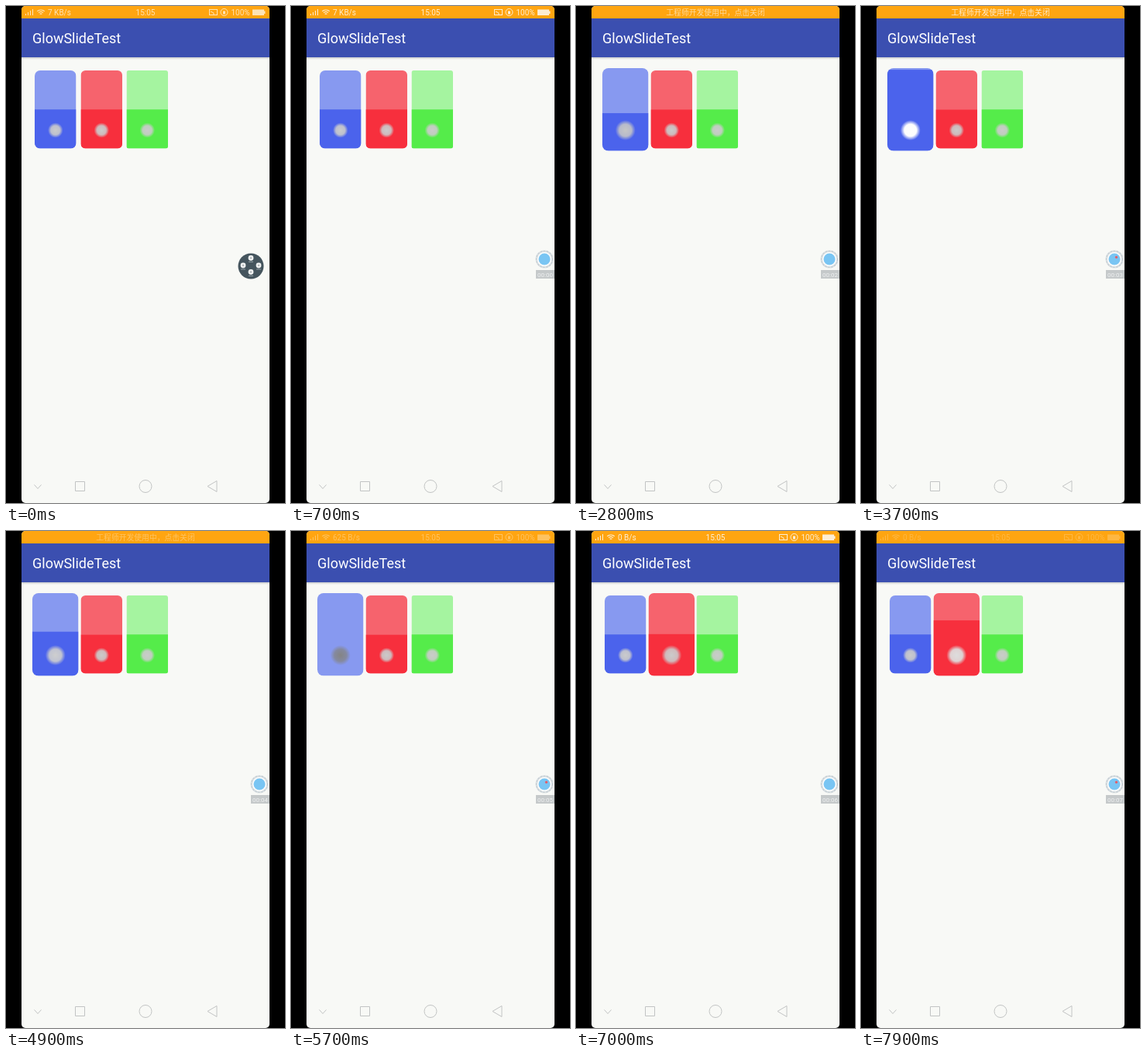
An HTML page with a canvas for the animation above (8 s loop, 360 px wide and 640 px high).

```html
<!DOCTYPE html>
<html lang="en">
<head>
<meta charset="utf-8">
<style>
html, body { margin: 0; width: 100%; height: 100%; overflow: hidden; background: #000; }
canvas { display: block; }
</style>
</head>
<body>
<canvas id="stage" width="360" height="640"></canvas>
<script>
const LOOP = 8000;
const ctx = document.getElementById('stage').getContext('2d');
const PAPER = '#f8f9f6', PALE = '#fdf3df';

const clamp = v => Math.max(0, Math.min(1, v));
const ramp = (t, from, to) => clamp((t - from) / (to - from));
const mix = (a, b, k) => a + (b - a) * k;

// Piecewise linear value from [time, value] pairs
function track(points, t) {
  let value = points[0][1];
  for (let i = 1; i < points.length; i++) {
    const [t0, v0] = points[i - 1], [t1, v1] = points[i];
    if (t >= t0) value = mix(v0, v1, ramp(t, t0, t1));
  }
  return value;
}

function rect(x, y, w, h, color) {
  ctx.fillStyle = color;
  ctx.fillRect(x, y, w, h);
}

function disc(x, y, r, color) {
  ctx.fillStyle = color;
  ctx.beginPath();
  ctx.arc(x, y, r, 0, 7);
  ctx.fill();
}

function ring(x, y, r, color, width = 1) {
  ctx.strokeStyle = color;
  ctx.lineWidth = width;
  ctx.beginPath();
  ctx.arc(x, y, r, 0, 7);
  ctx.stroke();
}

function line(points, color, closed) {
  ctx.strokeStyle = color;
  ctx.lineWidth = 1;
  ctx.beginPath();
  points.forEach(([x, y]) => ctx.lineTo(x, y));
  if (closed) ctx.closePath();
  ctx.stroke();
}

function label(text, x, y, size, color, align = 'left') {
  ctx.font = `${size}px Roboto, "Noto Sans CJK SC", "Noto Sans CJK", sans-serif`;
  ctx.textAlign = align;
  ctx.fillStyle = color;
  ctx.fillText(text, x, y);
}

function clipRound(x, y, w, h, r) {
  ctx.beginPath();
  ctx.roundRect(x, y, w, h, r);
  ctx.clip();
}

function statusIcons(t) {
  for (let i = 0; i < 4; i++) rect(25 + i * 3, 10 - i * 2, 1, 2 + i * 2, PALE);
  for (const r of [2, 4.5, 7]) {
    ctx.strokeStyle = PALE;
    ctx.lineWidth = 1.2;
    ctx.beginPath();
    ctx.arc(45, 12, r, -2.3, -0.84);
    ctx.stroke();
  }
  const speed = t < 5000 ? '7 KB/s' : t < 6200 ? '625 B/s' : '0 B/s';
  label(speed, 54, 12, 10, PALE);
  label('15:05', 180, 12, 10, PALE, 'center');

  ctx.strokeStyle = PALE;
  ctx.lineWidth = 1;
  ctx.strokeRect(262.5, 4.5, 10, 7);
  line([[264, 7], [268, 9], [268, 11]], PALE);
  ring(281.5, 8, 4.5, PALE);
  rect(280, 6.5, 3, 4, PALE);
  label('100%', 290.5, 12, 10, PALE);
  rect(318, 4.5, 15, 7.5, PALE);
  rect(333, 6.5, 1.5, 3.5, PALE);
}

function statusBar(t) {
  rect(20, 0, 320, 16, '#ffa511');
  ctx.globalAlpha = track([[0, .8], [800, .95], [1300, .95], [2250, 0], [5300, 0], [6300, .95], [7000, .95], [8200, 0]], t);
  statusIcons(t);
  ctx.globalAlpha = track([[2200, 0], [3000, .9], [4400, .9], [5300, 0]], t);
  label('工程师开发使用中，点击关闭', 180, 12, 9.8, PALE, 'center');
  ctx.globalAlpha = 1;
}

function appBar() {
  const shadow = ctx.createLinearGradient(0, 66, 0, 69);
  shadow.addColorStop(0, 'rgba(60,65,80,.25)');
  shadow.addColorStop(1, 'rgba(60,65,80,0)');
  rect(20, 66, 320, 3, shadow);
  rect(20, 16, 320, 50, '#3b4fb0');
  label('GlowSlideTest', 34, 47.5, 18, '#fff');
}

function sun(x, y, r, level) {
  const k = Math.pow(level, .8);
  const rgb = [0, 1, 2].map(() => Math.round(mix(132, 255, k)));
  const glow = ctx.createRadialGradient(x, y, 0, x, y, r);
  glow.addColorStop(0, `rgb(${rgb})`);
  glow.addColorStop(.6, `rgba(${rgb},${mix(.75, 1, k)})`);
  glow.addColorStop(1, `rgba(${rgb},0)`);
  disc(x, y, r, glow);
}

function slider({ x, light, dark, radius, level, grow }, t) {
  const g = grow(t), fill = level(t), pad = 3 * g;
  const top = 83 - pad, width = 53.5 + pad * 2, height = 100.5 + pad * 2;
  ctx.save();
  clipRound(x - pad, top, width, height, radius + g);
  rect(x - pad, top, width, height, light);
  rect(x - pad, top + height * (1 - fill), width, height * fill, dark);
  ctx.restore();
  sun(x + 26.8, 160, mix(9.8, 13, g), fill);
}

const sliders = [
  {
    x: 37, light: '#8799f0', dark: '#4b63ec', radius: 7,
    grow: t => ramp(t, 1200, 1400) - ramp(t, 6000, 6200),
    level: t => track([[0, .5], [1550, .5], [1700, .4], [2100, .08], [2250, .08], [2800, .455], [3500, .98],
      [4400, .98], [5500, 0], [6000, 0], [6200, .5]], t)
  },
  {
    x: 96.5, light: '#f6636d', dark: '#f72f3d', radius: 6,
    grow: t => ramp(t, 6450, 6650),
    level: t => track([[0, .5], [6950, .495], [7900, .67], [8000, .69]], t)
  },
  {
    x: 155.5, light: '#a5f4a0', dark: '#55ec4a', radius: 3,
    grow: () => 0,
    level: () => .5
  }
];

function recorderMenu(t) {
  const k = 1 - ramp(t, 80, 400);
  if (!k) return;
  ctx.save();
  ctx.translate(mix(327, 316, k), mix(326, 335, k));
  ctx.scale(k, k);
  disc(0, 0, 16.5, '#45555e');
  for (const [x, y] of [[0, -10.5], [-10, -1], [10, -1], [0, 7.5]]) {
    disc(x, y, 3.4, '#f0f2f2');
    disc(x, y, 1.3, '#b4babc');
    rect(x - 3, y + 4.5, 6, 1, '#93a0a6');
  }
  ctx.restore();
}

function recorder(t) {
  ctx.globalAlpha = ramp(t, 350, 700);
  disc(327, 326, 11.5, '#d9dfe2');
  ctx.setLineDash([2, 2]);
  ring(327, 326, 10.5, '#c3cbd0', 1.2);
  ctx.setLineDash([]);
  disc(327, 326, 9.2, '#fafbfb');
  disc(327, 326, 7.5, '#79c5f3');
  if (t % 2000 > 1200) disc(329.5, 323.5, 1.7, '#e0616c');
  rect(316, 340, 24, 11, '#c5c9ca');
  const seconds = Math.max(0, Math.floor((t - 100) / 1000));
  label(`00:0${seconds}`, 328, 348.5, 8, '#f0f2f2', 'center');
  ctx.globalAlpha = 1;
}

function navBar() {
  const color = '#c2c4c4';
  line([[36.5, 616.5], [41, 621.5], [45.5, 616.5]], color);
  line([[89.5, 612.5], [101.5, 612.5], [101.5, 624.5], [89.5, 624.5]], color, true);
  ring(180, 618.5, 8, color);
  line([[260, 618.5], [272, 611.5], [272, 625.5]], color, true);
}

function draw(t) {
  rect(0, 0, 360, 640, '#000');
  ctx.save();
  clipRound(20, 0, 320, 640, 5);
  rect(20, 0, 320, 640, PAPER);
  statusBar(t);
  appBar();
  sliders.forEach(s => slider(s, t));
  recorder(t);
  recorderMenu(t);
  navBar();
  ctx.restore();
}

const start = performance.now();
function tick() {
  draw((performance.now() - start) % LOOP);
  requestAnimationFrame(tick);
}
tick();
</script>
</body>
</html>
```
